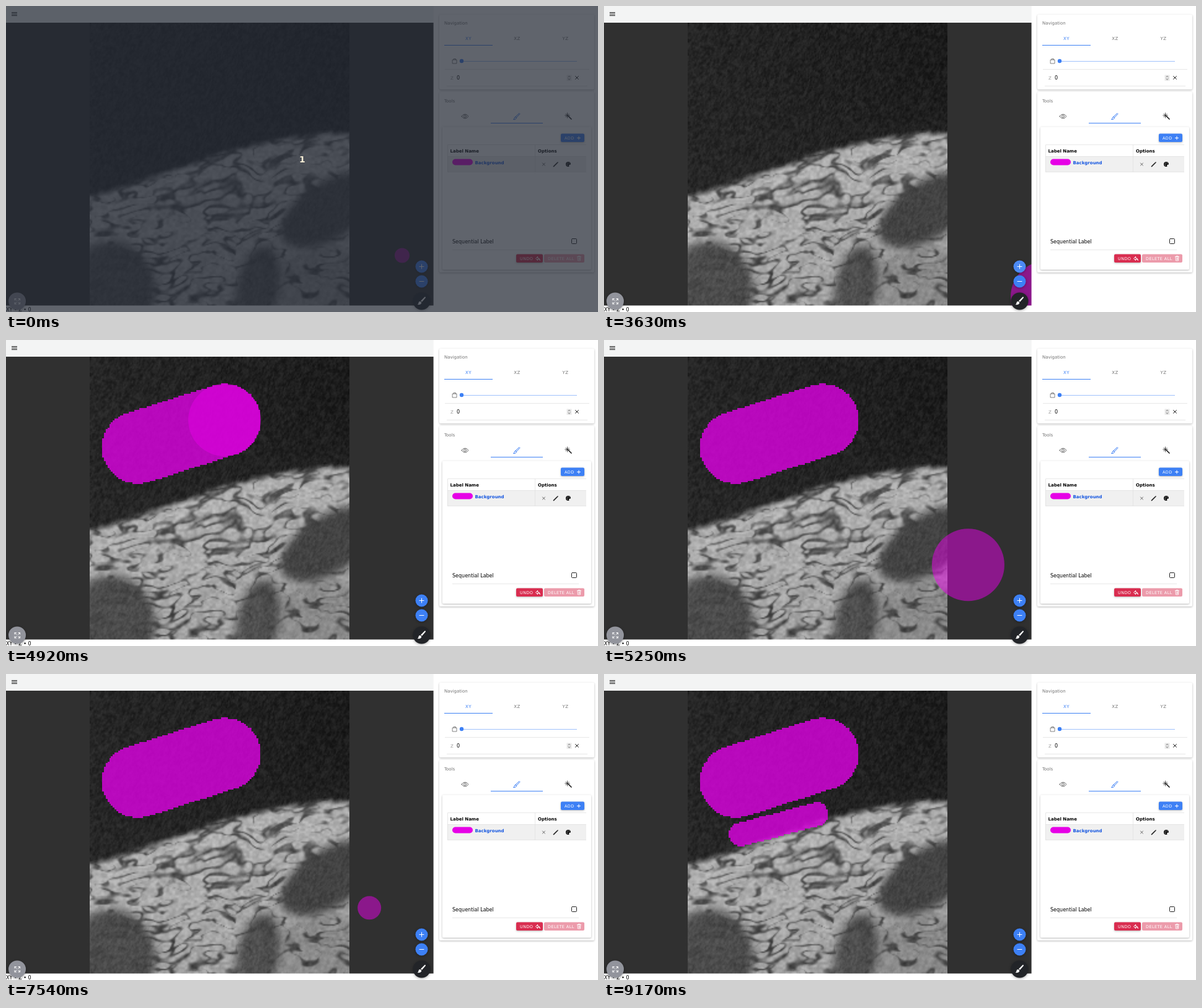
These frames come from a looping animation (955x495 px, 9.54 s). An HTML page with a canvas:

```html
<!DOCTYPE html>
<html lang="en">
<head>
<meta charset="utf-8">
<title>Label painting</title>
<style>
html, body { margin: 0; width: 100%; height: 100%; overflow: hidden; background: #fff; }
canvas, svg { position: absolute; left: 0; top: 0; }
canvas { top: 27px; }
svg { font: 7px "DejaVu Sans", sans-serif; }
.card { fill: #fff; filter: drop-shadow(0 1px 1.5px rgba(0,0,0,.28)); }
.fab { filter: drop-shadow(0 1px 2px rgba(0,0,0,.35)); }
.grey { fill: #737373; }
.blue { fill: #3d80f5; }
.bold { font-weight: bold; }
.tab { text-anchor: middle; letter-spacing: .4px; }
.btn { font-size: 6.5px; letter-spacing: .4px; fill: #fff; }
.rule { stroke: #dedede; stroke-width: .7; fill: none; }
.mark { stroke: #3d80f5; stroke-width: 1.2; }
.ico { fill: none; stroke: #222; stroke-linecap: round; stroke-linejoin: round; }
.dim { stroke: #666; }
.thin { stroke-width: .8; }
.thick { stroke-width: 1.7; }
.white { stroke: #fff; }
</style>
</head>
<body>
<canvas id="view" width="690" height="458"></canvas>
<svg width="955" height="495" viewBox="0 0 955 495">
  <rect width="690" height="27" fill="#f3f4f4"/>
  <path d="M9 10.5h9M9 13h9M9 15.5h9" stroke="#111" stroke-width="1.2"/>
  <path d="M0 484.5H689.6V0H955V495H0z" fill="#fff"/>
  <text y="493.5" font-size="8">XY • Z • 0</text>

  <rect class="card" x="699" y="14" width="250" height="121" rx="2"/>
  <text class="grey" x="707" y="29.5">Navigation</text>
  <g class="tab grey">
    <text class="blue" x="746" y="55">XY</text>
    <text x="824.5" y="55">XZ</text>
    <text x="902.5" y="55">YZ</text>
  </g>
  <path class="mark" d="M707 63.5h78"/>
  <path class="ico dim thin" d="M720.5 87h6.500v6h-6.500zM722 87v-1.500h3.500V87"/>
  <path d="M735 89.500h186" stroke="#9fc1fb"/>
  <circle class="blue" cx="735" cy="89" r="3.200"/>
  <path class="rule" d="M708 102.500h233M711 129.500h227"/>
  <text x="717" y="118.500" fill="#999">Z</text>
  <text x="727" y="119" font-size="8">0</text>
  <rect x="904.500" y="111.500" width="8" height="9.500" fill="#e9e9e9"/>
  <path class="ico dim thin" d="M907 115l1.500-2 1.500 2M907 117.500l1.500 2 1.500-2"/>
  <path class="ico" d="M918.500 113.500l5 5m0-5l-5 5"/>

  <rect class="card" x="699" y="139" width="250" height="292" rx="2"/>
  <text class="grey" x="707" y="155.500">Tools</text>
  <path class="ico dim" d="M735 178.500q5.500-7 11 0q-5.500 7-11 0z"/>
  <circle class="ico dim" cx="740.500" cy="178.500" r="1.900"/>
  <path class="ico" style="stroke:#3d80f5" d="M822 179l6-5.500 1 1-5.500 6zM822 179.500q-2 0-2 2t-1.500 2q4 .8 5-2.500z"/>
  <path class="ico thick" d="M907 178l5 5"/>
  <path class="ico thin" d="M905.500 173v8M901.800 177h7.500M903 174.500l5 5m0-5l-5 5"/>
  <path class="mark" d="M782 189.500h84"/>
  <rect class="card" x="704" y="195.500" width="240" height="231" rx="2"/>

  <rect class="card" style="fill:#3d80f5" x="895" y="206.500" width="38" height="13.500" rx="2"/>
  <text class="btn" x="901" y="215.500">ADD</text>
  <path class="ico white" d="M921.500 213.500h5m-2.500-2.500v5"/>

  <rect x="712" y="243.500" width="224" height="25" fill="#f0f0f0"/>
  <path class="rule" d="M712.500 268V224.500H936M712 243.500h224M712 268.500h224M853.500 224.500v44"/>
  <g class="bold">
    <text x="716.500" y="236.500">Label Name</text>
    <text x="858" y="236.500">Options</text>
    <text x="756.500" y="255.500" fill="#1355e0">Background</text>
  </g>
  <rect x="720" y="247.500" width="33" height="10" rx="5" fill="#e600e6"/>
  <path class="ico dim" d="M865.500 254l4 4m0-4l-4 4"/>
  <path class="ico thick" d="M883.500 259.500l5.500-5.500M890 253v0"/>
  <path d="M907 252a4 4 0 1 0 0 8q2 0 1.300-1.700t1-1.500q1.700.2 1.700-1.300Q910.500 252 907 252z" fill="#111"/>
  <path class="ico white" d="M905 256h0M906 254h0M908.500 254h0M905.500 258h0"/>

  <text x="720" y="383.500" font-size="8">Sequential Label</text>
  <rect class="ico" x="912.500" y="376.500" width="8" height="8" rx="1"/>
  <path class="rule" d="M720 394.500h204"/>
  <rect class="card" style="fill:#d92d50" x="823" y="401.500" width="43" height="13.500" rx="2"/>
  <text class="btn" x="829" y="410.500">UNDO</text>
  <path class="ico white" d="M857.500 405.500l-3 3 3 3v-2q3-.3 4 2-.3-4-4-4.200z"/>
  <rect x="868" y="401.500" width="65" height="13.500" rx="2" fill="#ec9bab"/>
  <text class="btn" x="874" y="410.500">DELETE ALL</text>
  <path class="ico white thin" d="M921.500 405.500h6m-4.500 0v-1h3v1m-4 0l.5 6.500h4l.5-6.500m-3 1.500v3.500m1.500-3.500v3.500"/>

  <g class="fab">
    <circle cx="18" cy="477.500" r="14" fill="#92949c"/>
    <circle cx="670.500" cy="477.500" r="14" fill="#222428"/>
    <circle class="blue" cx="670.500" cy="421.500" r="10"/>
    <circle class="blue" cx="670.500" cy="445.500" r="10"/>
  </g>
  <circle id="plus" cx="670.500" cy="421.500" r="10" fill="#fff"/>
  <circle id="minus" cx="670.500" cy="445.500" r="10" fill="#fff"/>
  <path class="ico white" d="M667 421.500h7m-3.500-3.500v7M667 445.500h7"/>
  <path class="ico white" d="M14 476v-2.500h2.500m-2.500 0l3 3M22.500 476v-2.500H20m2.500 0l-3 3M14 479.500v2.500h2.500m-2.500 0l3-3M22.500 479.500v2.500H20m2.500 0l-3-3"/>
  <path d="M669 477l6.500-6.500q1.500-.3 1.500 1.200l-6 7zM668.300 477.800l2 2q-.3 4.200-6.800 3.300 2-.5 2-2.800t2.800-2.500z" fill="#fff"/>

  <g id="intro">
    <rect width="955" height="495" fill="rgba(36,42,53,.725)"/>
    <text class="bold" x="473" y="253" font-size="14" fill="#f8eed6">1</text>
  </g>
</svg>
<script>
const LOOP = 9540, LEFT = 135, TOP = 27, W = 419, H = 458, STEP = 2, CELL = 2.865;
const $ = id => document.getElementById(id);
const ctx = $('view').getContext('2d');

const clamp = v => Math.min(1, Math.max(0, v));
const mix = (a, b, f) => a + (b - a) * f;
const fract = v => v - Math.floor(v);
const hash = (x, y) => fract(Math.sin(x * 127.1 + y * 311.7) * 43758.5453);
function smooth(a, b, v) {
  const f = clamp((v - a) / (b - a));
  return f * f * (3 - 2 * f);
}
function noise(x, y) {
  const i = Math.floor(x), j = Math.floor(y), u = smooth(0, 1, x - i), v = smooth(0, 1, y - j);
  return mix(mix(hash(i, j), hash(i + 1, j), u), mix(hash(i, j + 1), hash(i + 1, j + 1), u), v);
}

// Darker areas inside the tissue, as soft tilted ellipses
const shades = [
  { x: 390, y: 302, rx: 92, ry: 46, tilt: -.55, level: 1 },
  { x: 35, y: 432, rx: 72, ry: 78, tilt: 0, level: .9 },
  { x: 272, y: 428, rx: 34, ry: 70, tilt: .2, level: .85 },
  { x: 375, y: 420, rx: 95, ry: 60, tilt: -.2, level: .25 }
];
const surface = x => 280 - 102 * Math.sin(x / W * Math.PI / 2) ** 1.2;

function makeScan() {
  const c = document.createElement('canvas'), w = c.width = Math.ceil(W / STEP), h = c.height = H / STEP;
  const g = c.getContext('2d');
  g.fillRect(0, 0, w, h);
  g.scale(1 / STEP, 1 / STEP);
  g.filter = 'blur(3px)';
  for (const s of shades) {
    g.fillStyle = `rgba(255,255,255,${s.level})`;
    g.beginPath();
    g.ellipse(s.x, s.y, s.rx, s.ry, s.tilt, 0, Math.PI * 2);
    g.fill();
  }
  const img = g.getImageData(0, 0, w, h), px = img.data;
  for (let n = 0; n < w * h; n++) {
    const x = n % w * STEP, y = Math.floor(n / w) * STEP;
    const depth = y - surface(x) + (noise(x / 9, y / 9) - .5) * 5;
    const grain = (noise((x * .9 + y * .45) / 2.2, (y * .9 - x * .45) / 5) - .5) * 22 + (hash(x, y) - .5) * 10;
    const air = 38 - 10 * (x / W) * smooth(300, 60, y) + grain;
    // Short broken cracks: contour lines of stretched noise
    const u = x + 18 * noise(x / 25, y / 15), v = y + x * .12 + 24 * noise(x / 40, y / 60);
    const ridge = Math.abs(noise(u / 26, v / 11) * .7 + noise(u / 13 + 5, v / 7) * .3 - .47) * 3.4;
    const body = smooth(-.1, .5, ridge + (noise(u / 20 + 9, v / 9) - .42) * .7);
    const tissue = 82 + 96 * body - depth * .06 + (noise(x / 5, y / 4) - .5) * 34 + grain * .4;
    const value = mix(air, mix(tissue, 67 + grain, px[n * 4] / 255), smooth(-8, 8, depth));
    px.fill(value, n * 4, n * 4 + 3);
  }
  g.putImageData(img, 0, 0);
  return c;
}
const scan = makeScan();

// A step either glides the brush to x, y (lift bows the path upwards)
// or resizes it to r with its top left corner held
const steps = [
  { from: 210, to: 500, x: 670, y: 421.5 },
  { from: 670, to: 1580, r: 21.5 },
  { from: 1580, to: 1630, x: 670.5, y: 428.5 },
  { from: 1630, to: 2580, r: 31.5 },
  { from: 2630, to: 3580, r: 58.5 },
  { from: 3580, to: 3630, x: 714.5, y: 470.5 },
  { from: 3630, to: 4330, x: 213, y: 174, lift: 115 },
  { from: 4500, to: 4860, x: 352.5, y: 129.5, paint: true },
  { from: 4930, to: 5470, x: 670, y: 446 },
  { from: 5600, to: 6380, r: 46 },
  { from: 6420, to: 7380, r: 19 },
  { from: 7420, to: 7460, x: 663, y: 441 },
  { from: 7460, to: 8130, x: 220.5, y: 259.5, lift: 60 },
  { from: 8290, to: 8500, x: 343, y: 227, paint: true },
  { from: 8630, to: 9170, x: 39, y: 5 }
];

function brush(t) {
  let x = 639, y = 403.5, r = 12;
  for (const s of steps) {
    if (t <= s.from) break;
    const f = clamp((t - s.from) / (s.to - s.from));
    if (s.r) {
      const grow = (s.r - r) * f;
      x += grow;
      y += grow;
      r += grow;
    } else {
      const e = 1 - (1 - f) ** 1.5;
      x = mix(x, s.x, e);
      y = mix(y, s.y, e) - (s.lift || 0) * Math.sin(Math.PI * e);
    }
  }
  return { x, y, r };
}

// Sweep of the brush from a to b, snapped to the label grid row by row
function sweep(a, b) {
  const dx = b.x - a.x, dy = b.y - a.y, len = dx * dx + dy * dy || 1, r = a.r;
  const cell = (v, o) => Math.round((v - o) / CELL);
  const edge = (i, o) => Math.round(o + i * CELL);
  for (let j = cell(Math.min(a.y, b.y) - r, TOP); j < cell(Math.max(a.y, b.y) + r, TOP); j++) {
    const y = TOP + (j + .5) * CELL, top = edge(j, TOP);
    let first = null, last;
    for (let i = cell(a.x - r, LEFT); i < cell(b.x + r, LEFT); i++) {
      const x = LEFT + (i + .5) * CELL;
      const f = clamp(((x - a.x) * dx + (y - a.y) * dy) / len);
      if (Math.hypot(x - a.x - f * dx, y - a.y - f * dy) > r) continue;
      first ??= edge(i, LEFT);
      last = edge(i + 1, LEFT);
    }
    if (first !== null) ctx.fillRect(first, top, last - first, edge(j + 1, TOP) - top);
  }
}

// Hover tint that pulses with each press
function glow(id, t, from, to) {
  const pulse = .14 + .12 * Math.cos((t - 1580) / 410 * Math.PI * 2);
  $(id).setAttribute('opacity', t < from || t > to ? 0 : t >= to - 40 ? .08 : pulse);
}

function draw(t) {
  ctx.setTransform(1, 0, 0, 1, 0, -TOP);
  ctx.fillStyle = '#303030';
  ctx.fillRect(0, TOP, 690, H);
  ctx.drawImage(scan, LEFT, TOP, W, H);
  ctx.fillStyle = 'rgba(230,0,235,.77)';
  for (const s of steps)
    if (s.paint && t >= s.from) sweep(brush(s.from), brush(Math.min(t, s.to)));
  const { x, y, r } = brush(t);
  ctx.fillStyle = 'rgba(230,0,230,.5)';
  ctx.beginPath();
  ctx.arc(x, y, r, 0, Math.PI * 2);
  ctx.fill();
  glow('plus', t, 500, 3630);
  glow('minus', t, 5470, 7460);
  $('intro').style.display = t < 40 ? '' : 'none';
}

const start = performance.now();
function tick() {
  const t = (performance.now() - start) % LOOP;
  // 24 pictures a second, timed in whole hundredths
  draw(Math.round(Math.floor((t + 5) * .024) / .24) * 10);
  requestAnimationFrame(tick);
}
tick();
</script>
</body>
</html>
```
